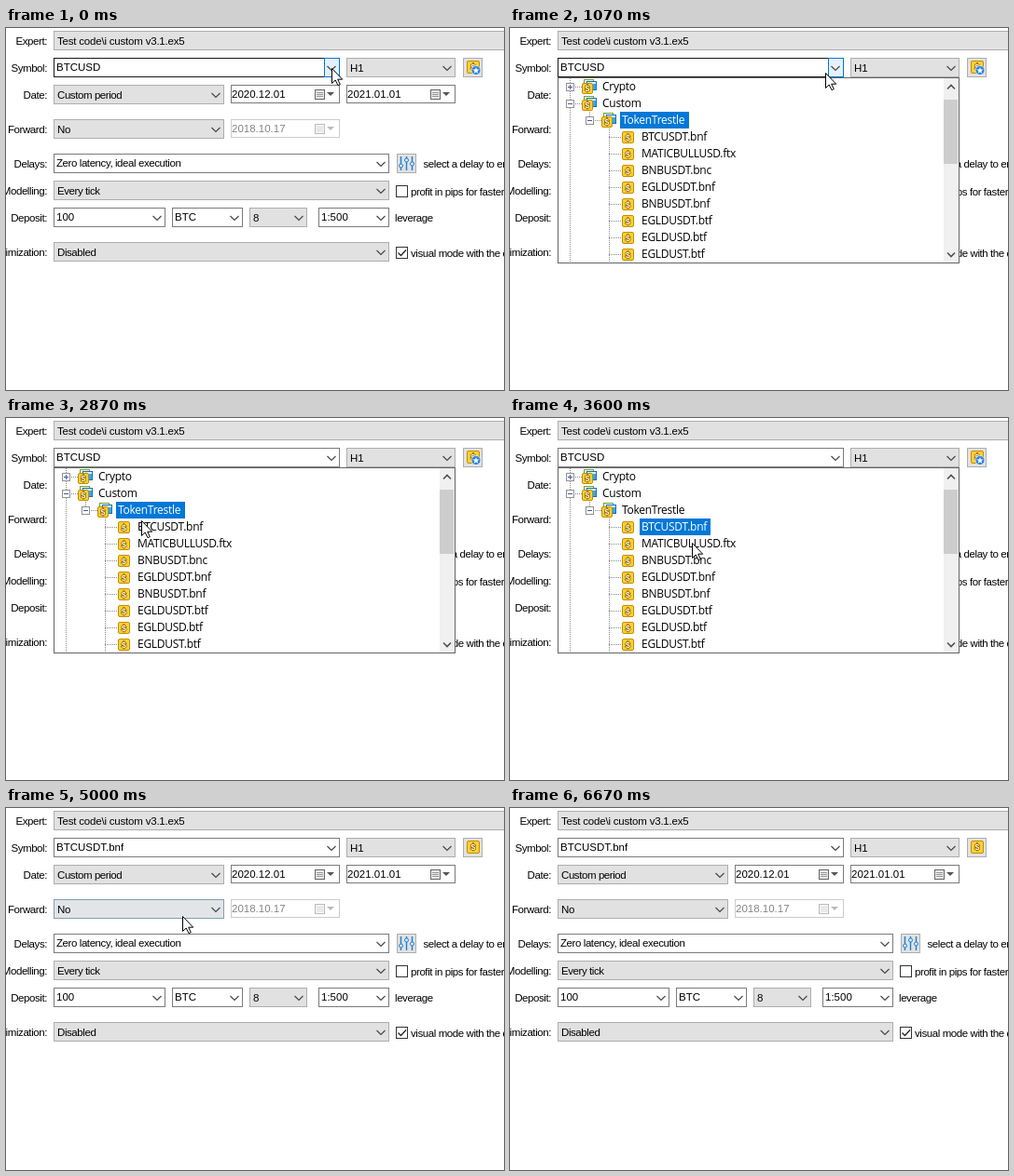
Animation, 534 px wide and 389 px high, one loop 7670 ms. Source, as an HTML page:

```html
<!DOCTYPE html>
<html lang="en">
<head>
<meta charset="utf-8">
<title>Tester settings</title>
<style>
  html, body { margin: 0; width: 100%; height: 100%; overflow: hidden; background: #fff; }
  svg { display: block; width: 534px; height: 389px; }
  rect, .dots { shape-rendering: crispEdges; }
  .round { shape-rendering: auto; }
  text { font: 11.5px "Liberation Sans", Arial, sans-serif; letter-spacing: -.42px; white-space: pre; }
  .wide { letter-spacing: 0; }
  .mid { letter-spacing: -.2px; }
  .tree { font: 12px "Open Sans", "Noto Sans", sans-serif; letter-spacing: -.27px; }
  .dollar { font: bold 9.5px "Liberation Sans", Arial, sans-serif; letter-spacing: 0; text-anchor: middle; }
  .dots { stroke: #8a8a8a; stroke-dasharray: 1 1; fill: none; }
</style>
</head>
<body>
<svg id="stage" viewBox="0 0 534 389" xmlns="http://www.w3.org/2000/svg"></svg>
<script>
const LOOP = 7670, STEP = 200 / 3;
const BLUE = '#0078d7', PALE = '#e5f1fb';

const box = (x, y, r, b, fill, stroke, extra = '') =>
  `<rect x="${x + .5}" y="${y + .5}" width="${r - x - 1}" height="${b - y - 1}" fill="${fill}" stroke="${stroke}" ${extra}/>`;
const fillBox = (x, y, r, b, fill) =>
  `<rect x="${x}" y="${y}" width="${r - x}" height="${b - y}" fill="${fill}"/>`;
const text = (x, y, s, cls = '', extra = '') => `<text x="${x}" y="${y}" class="${cls}" ${extra}>${s}</text>`;
const line = (d, color, w = 1, extra = '') => `<path d="${d}" fill="none" stroke="${color}" stroke-width="${w}" ${extra}/>`;
const label = (y, s) => text(44, y, s, '', 'text-anchor="end"');
const chevron = (x, y, color = '#444') => line(`M${x - 4.5} ${y - 2}l4.5 4.5l4.5 -4.5`, color, 1.1);

// A drop-down field; grey ones are pure selectors, white ones are editable.
function combo(x, y, r, s, { grey = false, cls = '', pad = grey ? 4 : 3, id = '', hover = '' } = {}) {
  return box(x, y, r, y + 21, grey ? '#e1e1e1' : '#fff', grey ? '#adadad' : '#7a7a7a')
    + hover + text(x + pad, y + (grey ? 15 : 14), s, cls, id && `id="${id}"`)
    + chevron(r - 9, y + 11);
}

function dateField(x, y, s, off = false) {
  const ink = off ? '#bbb' : '#666', cx = x + 90;
  return box(x, y, x + 117, y + 20, '#fff', off ? '#ccc' : '#7a7a7a')
    + text(x + 1, y + 14, s, 'wide', `fill="${off ? '#838383' : '#000'}"`)
    + box(cx, y + 5, cx + 11, y + 16, off ? '#f4f4f4' : '#e9e9e9', ink)
    + line(`M${cx + 2} ${y + 8.5}h7M${cx + 2} ${y + 10.5}h7M${cx + 2} ${y + 12.5}h7`, off ? '#ddd' : '#999')
    + `<path d="M${cx + 13} ${y + 8}h8l-4 4z" fill="${off ? '#bbb' : '#555'}"/>`;
}

const button = (x, y) => box(x, y, x + 21, y + 21, '#e1e1e1', '#adadad');

const coin = (x, y, s = 13) =>
  box(x, y, x + s, y + s, '#ffd02e', '#c48d00', 'rx="1.5" class="round"')
  + text(x + s / 2, y + s / 2 + 3.4, '$', 'dollar',
    'fill="#fff6c8" stroke="#7a5200" stroke-width="1.3" paint-order="stroke"');

const folder = (x, y) =>
  box(x + 2, y, x + 13, y + 10, '#e9f5dc', '#6fa33a')
  + box(x + 5, y + 2, x + 16, y + 12, '#35a9ee', '#1671b5') + fillBox(x + 6, y + 3, x + 15, y + 5, '#d8f0ff')
  + coin(x, y + 4, 12);

function checkbox(x, y, on) {
  return box(x, y, x + 13, y + 13, '#fff', '#333')
    + (on ? line(`M${x + 2.5} ${y + 6.5}l3 3l5.5 -6`, '#222', 1.3) : '');
}

function star(cx, cy, r) {
  const points = Array.from({ length: 10 }, (_, i) => {
    const a = i * Math.PI / 5 - Math.PI / 2, d = i % 2 ? r * .42 : r;
    return `${cx + d * Math.cos(a)},${cy + d * Math.sin(a)}`;
  });
  return `<polygon points="${points.join(' ')}" fill="#fff"/>`;
}

function sliders(x, y) {
  return [[5, 13], [11, 7], [17, 11]].map(([dx, dy]) =>
    line(`M${x + dx - .5} ${y + 3}v15`, '#1f7ed0', 1.4)
    + `<circle cx="${x + dx - .5}" cy="${y + dy}" r="2" fill="#d9eeff" stroke="#1f7ed0"/>`).join('');
}

function form() {
  const symbolHover = `<g id="symbolHover">${box(51, 32, 358, 53, '#fff', '#171717')}${box(341, 32, 358, 53, PALE, BLUE)}</g>`;
  const forwardHover = box(51, 98, 234, 119, PALE, BLUE, 'id="forwardHover"');
  const delayHover = box(51, 135, 411, 156, '#fff', '#171717', 'id="delayHover"');
  return label(18, 'Expert:') + box(51, 3, 560, 24, '#e1e1e1', '#adadad')
    + text(55, 18, 'Test code\\i custom v3.1.ex5', 'mid')
    + label(47, 'Symbol:') + combo(51, 32, 358, '', { cls: 'wide', id: 'symbol', hover: symbolHover })
    + combo(365, 32, 482, 'H1', { grey: true, cls: 'wide' })
    + button(490, 32) + coin(494, 35, 14)
    + `<g id="badge"><circle cx="504" cy="45.5" r="5" fill="#2c83dc" stroke="#fff" stroke-width=".7"/>${star(504, 45.7, 3.8)}</g>`
    + label(76, 'Date:') + combo(51, 61, 234, 'Custom period', { grey: true })
    + dateField(241, 61, '2020.12.01') + dateField(365, 61, '2021.01.01')
    + label(113, 'Forward:') + combo(51, 98, 234, 'No', { grey: true, hover: forwardHover })
    + dateField(241, 98, '2018.10.17', true)
    + label(150, 'Delays:') + combo(51, 135, 411, 'Zero latency, ideal execution', { hover: delayHover })
    + button(419, 135) + sliders(419, 135) + text(447.5, 150, 'select a delay to emulate')
    + label(179, 'Modelling:') + combo(51, 164, 411, 'Every tick', { grey: true })
    + checkbox(418, 169) + text(434, 180, 'profit in pips for faster calculations')
    + label(208, 'Deposit:') + combo(51, 193, 171, '100', { cls: 'wide' })
    + combo(178, 193, 254, 'BTC', { cls: 'wide' }) + combo(261, 193, 323, '8', { grey: true, cls: 'wide' })
    + combo(335, 193, 411, '1:500', { cls: 'wide' }) + text(417, 208, 'leverage')
    + label(245, 'Optimization:') + combo(51, 230, 411, 'Disabled', { grey: true })
    + checkbox(418, 235, true) + text(434, 246, 'visual mode with the display of charts');
}

const TREE = [['Crypto', 0, '+'], ['Custom', 0, '-'], ['TokenTrestle', 1, '-'],
  ...['BTCUSDT.bnf', 'MATICBULLUSD.ftx', 'BNBUSDT.bnc', 'EGLDUSDT.bnf', 'BNBUSDT.bnf',
    'EGLDUSDT.btf', 'EGLDUSD.btf', 'EGLDUST.btf'].map(s => [s, 2])];

function popup() {
  const rows = TREE.map(([name, depth, sign], i) => {
    const y = 63 + 18 * i, x = 64 + 21 * depth;
    const link = `<path class="dots" d="M${x} ${y + .5}h13"/>`;
    const toggle = sign ? box(x - 4, y - 4, x + 5, y + 5, '#fff', '#919191')
      + line(`M${x - 2} ${y + .5}h5` + (sign === '+' ? `M${x + .5} ${y - 2}v5` : ''), '#3c5aa8') : '';
    const icon = depth < 2 ? folder(x + 13, y - 8) : coin(120, y - 6);
    return link + toggle + icon + text(depth < 2 ? x + 35 : 141, y + 4, name, 'tree', `id="row${i}"`);
  }).join('');
  return box(51, 53, 482, 253, '#fff', '#646464')
    + '<path class="dots" d="M64.5 54V252M85.5 88V99M106.5 108V252"/>'
    + `<g id="pickA">${fillBox(118, 90, 192, 108, BLUE)}</g><g id="pickB">${fillBox(139, 108, 215, 126, BLUE)}</g>`
    + rows + fillBox(465, 54, 481, 252, '#f0f0f0') + fillBox(465, 77, 480, 146, '#cdcdcd')
    + line('M469 65.5l4 -4l4 4M469 241.5l4 4l4 -4', '#505050', 1.6);
}

const stage = document.getElementById('stage');
stage.innerHTML = form() + `<g id="popup">${popup()}</g>`
  + '<path id="cursor" d="M.5 .5V16.5L4.2 13L7 18.7L9.3 17.6L6.7 12.2H11.7Z" fill="#fff" stroke="#000"/>';
const part = id => document.getElementById(id);

// Pointer stops: step, x, y
const PATH = [[15, 349, 43], [16, 338, 48], [20, 262, 74], [24, 194, 91], [27, 167, 89],
  [28, 157, 88], [32, 120, 79], [35, 113, 79], [36, 113, 79], [38, 110, 82], [42, 137, 105], [45, 161, 120],
  [49, 161, 120], [54, 195, 134], [61, 217, 161], [65, 202, 137], [69, 189, 116],
  [82, 189, 116], [87, 205, 136], [91, 222, 220], [94, 234, 313], [100, 246, 392]];

function pointer(k) {
  const i = PATH.findIndex(p => p[0] > k);
  if (i === 0) return PATH[0].slice(1);
  if (i < 0) return PATH[PATH.length - 1].slice(1);
  const [k0, x0, y0] = PATH[i - 1], [k1, x1, y1] = PATH[i], f = (k - k0) / (k1 - k0);
  return [Math.round(x0 + (x1 - x0) * f), Math.round(y0 + (y1 - y0) * f)];
}

const ramp = (k, a, b) => Math.min(1, Math.max(0, (k - a) / (b - a)));
const show = (id, on) => part(id).setAttribute('display', on ? 'inline' : 'none');
const fade = (id, v) => part(id).setAttribute('opacity', v);

function render(ms) {
  const k = Math.floor((ms + 4) / STEP);
  const picked = k >= 46, closed = k >= 74;
  show('popup', k >= 6 && !closed);
  show('pickA', !picked);
  show('pickB', picked);
  part('row2').setAttribute('fill', picked ? '#000' : '#fff');
  part('row3').setAttribute('fill', picked ? '#fff' : '#000');
  part('symbol').textContent = closed ? 'BTCUSDT.bnf' : 'BTCUSD';
  show('badge', !closed);
  fade('symbolHover', 1 - ramp(k, 16, 20));
  fade('forwardHover', ramp(k, 74, 78) * (1 - ramp(k, 86, 91)));
  fade('delayHover', ramp(k, 87, 89) * (1 - ramp(k, 93, 97)));
  part('cursor').setAttribute('transform', `translate(${pointer(k).join(' ')})`);
}

const start = performance.now();
function tick() {
  render((performance.now() - start) % LOOP);
  requestAnimationFrame(tick);
}
render(0);
requestAnimationFrame(tick);
</script>
</body>
</html>
```
